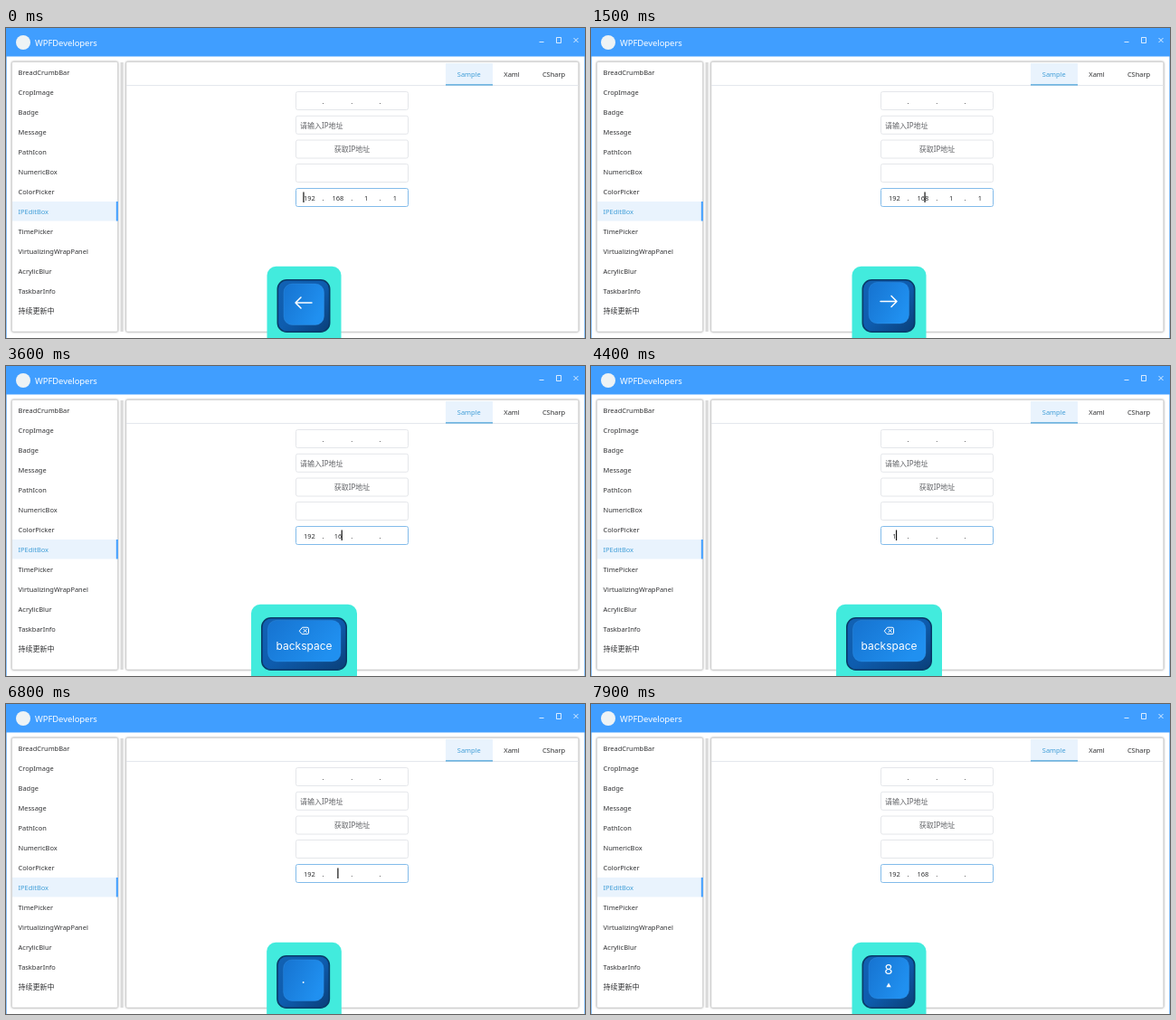
An HTML page for the animation above (8000 ms loop, 640x343 px).

```html
<!DOCTYPE html>
<html lang="zh">
<head>
<meta charset="utf-8">
<title>IPEditBox</title>
<style>
  html, body { margin: 0; width: 100%; height: 100%; overflow: hidden; background: #fff; }
  svg { display: block; width: 100vw; height: 100vh; }
  text { font: 7.45px "Noto Sans", "Noto Sans CJK SC", "Noto Sans CJK", sans-serif; fill: #303133; white-space: pre; }
  text.cjk { font-size: 8px; }
  text.hint { fill: #606266; }
  text.on { fill: #409ed8; }
  .mid { text-anchor: middle; }
  .box { fill: #fff; stroke: #e4e6ea; }
  .card { fill: #fff; stroke: #d2d2d2; stroke-width: .7; filter: drop-shadow(0 .6px 1.2px #0006); }
  .line { fill: none; stroke: #fff; }
  #face text { font: 12px Inter, "Open Sans", sans-serif; fill: #fff; text-anchor: middle; }
  #face text.big { font-size: 15px; }
  #face path { fill: none; stroke: #fff; stroke-width: 1.5; stroke-linecap: round; stroke-linejoin: round; }
  #face path.solid { fill: #fff; stroke: none; }
</style>
</head>
<body>
<svg viewBox="0 0 640 343" preserveAspectRatio="none">
  <defs>
    <linearGradient id="side" x1="0" y1="0" x2="1" y2="1">
      <stop offset="0" stop-color="#1262b4"/>
      <stop offset=".5" stop-color="#0e5cae"/>
      <stop offset="1" stop-color="#0a3f78"/>
    </linearGradient>
    <linearGradient id="top" x1="0" y1="0" x2="1" y2=".5">
      <stop offset="0" stop-color="#1673d0"/>
      <stop offset="1" stop-color="#2090f0"/>
    </linearGradient>
  </defs>
  <rect width="640" height="343" fill="#fff"/>
  <path d="M.5 31V343M639.5 31V343" stroke="#8fc4fa"/>
  <rect width="640" height="31.5" fill="#409eff"/>
  <circle cx="19" cy="16" r="8" fill="#eef3f5"/>
  <text x="32" y="20" style="font-size:9.4px;fill:#fff">WPFDevelopers</text>
  <path class="line" stroke-width=".8" d="M589.5 15.5h5M608.5 10.5h5v6h-5zM627.5 11l5 5m0-5l-5 5"/>

  <rect class="card" x="6.5" y="37.5" width="117" height="298.5" rx="1.5"/>
  <rect x="126.5" y="38" width="3.2" height="298" fill="#d9d9d9"/>
  <rect class="card" x="132.8" y="37.5" width="500" height="298.5" rx="1.5"/>
  <rect x="7" y="192" width="116.5" height="21.5" fill="#e9f3fd"/>
  <rect x="121.8" y="192" width="2" height="21.5" fill="#409eff"/>
  <g id="menu"></g>

  <path d="M133 63.5H632.5" stroke="#e4e7ed"/>
  <rect x="486" y="39" width="52" height="24" fill="#e9f3fd"/>
  <rect x="486" y="62.3" width="52" height="1.2" fill="#409ed8"/>
  <text class="mid on" x="511.8" y="54.3">Sample</text>
  <text class="mid" x="559" y="54.3">Xaml</text>
  <text class="mid" x="605.5" y="54.3">CSharp</text>

  <g id="boxes"></g>
  <text class="cjk hint" x="325" y="110.8">请输入IP地址</text>
  <text class="cjk hint mid" x="382.5" y="137.3">获取IP地址</text>
  <g id="octets"></g>
  <rect id="caret" y="181.5" width="1.2" height="11.5" fill="#111"/>

  <rect id="panel" y="263.7" height="95" rx="10" fill="#42ebdd"/>
  <g id="key">
    <rect id="base" x=".8" y="278.8" height="57.4" rx="10" fill="url(#side)" stroke="#083a68" stroke-width="1.6"/>
    <g id="cap">
      <rect id="lid" x="7.5" y="280.5" height="45.5" rx="9.5" fill="url(#top)" stroke="#3a9df0" stroke-opacity=".45" stroke-width=".7"/>
      <g id="face"></g>
    </g>
  </g>
</svg>
<script>
const LOOP = 8000, STEP = 100, CENTER = 329.5, DIGIT = 4.3;
const OCTET_X = [335.4, 366.9, 398.2, 430];
const DOT_X = [350.6, 382.2, 413.6];
const $ = id => document.getElementById(id);
const set = (el, attrs) => { for (const k in attrs) el.setAttribute(k, attrs[k]); };

const menu = ['BreadCrumbBar', 'CropImage', 'Badge', 'Message', 'PathIcon', 'NumericBox', 'ColorPicker',
  'IPEditBox', 'TimePicker', 'VirtualizingWrapPanel', 'AcrylicBlur', 'TaskbarInfo', '持续更新中'];
$('menu').innerHTML = menu.map((name, i) => {
  const style = i === 7 ? 'on' : i === 12 ? 'cjk' : '';
  return `<text class="${style}" x="13.6" y="${52 + 22 * i}">${name}</text>`;
}).join('');

const dots = y => DOT_X.map(x => `<text class="mid" x="${x}" y="${y}">.</text>`).join('');
$('boxes').innerHTML = [70.5, 97.3, 124, 150.5, 177.5].map((y, i) =>
  `<rect class="box" x="320.5" y="${y}" width="124" height="20" rx="2"${i === 4 ? ' style="stroke:#82bbea"' : ''}/>`
).join('') + dots(84) + dots(191);
$('octets').innerHTML = OCTET_X.map(x => `<text class="mid" x="${x}" y="190.6"></text>`).join('');
const octetEls = [...$('octets').children];

// Key faces, drawn around x = 0
const label = (s, y, big) => `<text class="${big ? 'big' : ''}" y="${y}">${s}</text>`;
const digit = (n, extra) => label(n, 298.5, true) + extra;
const tri = angle => `<path class="solid" transform="translate(0 311) rotate(${angle})" d="M-2.6 2.2L0-2.6L2.6 2.2z"/>`;
const faces = {
  left: '<path d="M9 301.5H-9m6-6l-6 6l6 6"/>',
  right: '<path d="M-9 301.5H9m-6-6l6 6l-6 6"/>',
  back: '<path style="stroke-width:1" d="M-5 292l3-3.7h5.5q1.5 0 1.5 1.5v4.4q0 1.5-1.5 1.5h-5.5zM-.7 290.2l3.6 3.6m0-3.6l-3.6 3.6"/>' + label('backspace', 313),
  '.': label('.', 306.8, true),
  1: digit(1, label('end', 314.5)),
  2: digit(2, tri(180)),
  6: digit(6, tri(90)),
  8: digit(8, tri(0)),
  9: digit(9, label('pgup', 314.5))
};
const panelWidth = key => key === 'back' ? 117 : key === '.' ? 83 : 82;

// Key presses: time and key
const presses = [[0, 'left']];
for (let t = 400; t <= 2400; t += 200) presses.push([t, 'right']);
for (let t = 3100; t <= 4500; t += 200) presses.push([t, 'back']);
presses.push([6300, '1'], [6500, '9'], [6700, '2'], [6800, '.'], [7000, '1'], [7200, '6'], [7400, '8']);

function press(state, key) {
  const octets = [...state.octets];
  let { i, pos } = state;
  if (key === 'right') {
    if (pos < octets[i].length) pos++;
    else { i++; pos = 0; }
  } else if (key === 'back') {
    octets[i] = octets[i].slice(0, -1);
    if (!octets[i] && i > 0) i--;
    pos = octets[i].length;
  } else if (key === '.') {
    if (octets[i]) { i++; pos = 0; }
  } else if (key !== 'left') {
    octets[i] += key;
    pos = octets[i].length;
    if (pos === 3) { i++; pos = 0; }
  }
  return { octets, i, pos };
}

let state = { octets: ['192', '168', '1', '1'], i: 0, pos: 0 };
let from = 82, to = 82, since = 0;
const states = presses.map(([time, key]) => {
  state = press(state, key);
  if (panelWidth(key) !== to) { from = to; to = panelWidth(key); since = time; }
  return { ...state, time, key, from, to, since };
});

let shownKey;
function draw(t) {
  const s = states.filter(e => e.time <= t).pop();
  const age = t - s.time;

  octetEls.forEach((el, n) => { el.textContent = s.octets[n]; });
  const hidden = [500, 1100, 1500].filter(x => age >= x).length % 2;
  const x = OCTET_X[s.i] + (s.pos - s.octets[s.i].length / 2) * DIGIT;
  set($('caret'), { x: x - .6, visibility: hidden ? 'hidden' : 'visible' });

  const width = s.to + (s.from - s.to) * Math.exp(-(t - s.since + 60) / 52);
  const left = CENTER - width / 2;
  const keyWidth = s.key === 'back' ? 95 : 59;
  set($('panel'), { x: left, width });
  set($('key'), { transform: `translate(${left + 11} 0)` });
  set($('base'), { width: keyWidth - 1.6 });
  set($('lid'), { width: keyWidth - 14.5 });
  set($('cap'), { transform: `translate(0 ${2.5 * Math.exp(-age / 100)})` });
  set($('face'), { transform: `translate(${keyWidth / 2} 0)` });
  if (shownKey !== s.key) $('face').innerHTML = faces[shownKey = s.key];
}

const start = performance.now();
function tick() {
  const t = (performance.now() - start) % LOOP;
  draw(Math.floor(t / STEP) * STEP);
  requestAnimationFrame(tick);
}
tick();
</script>
</body>
</html>
```
